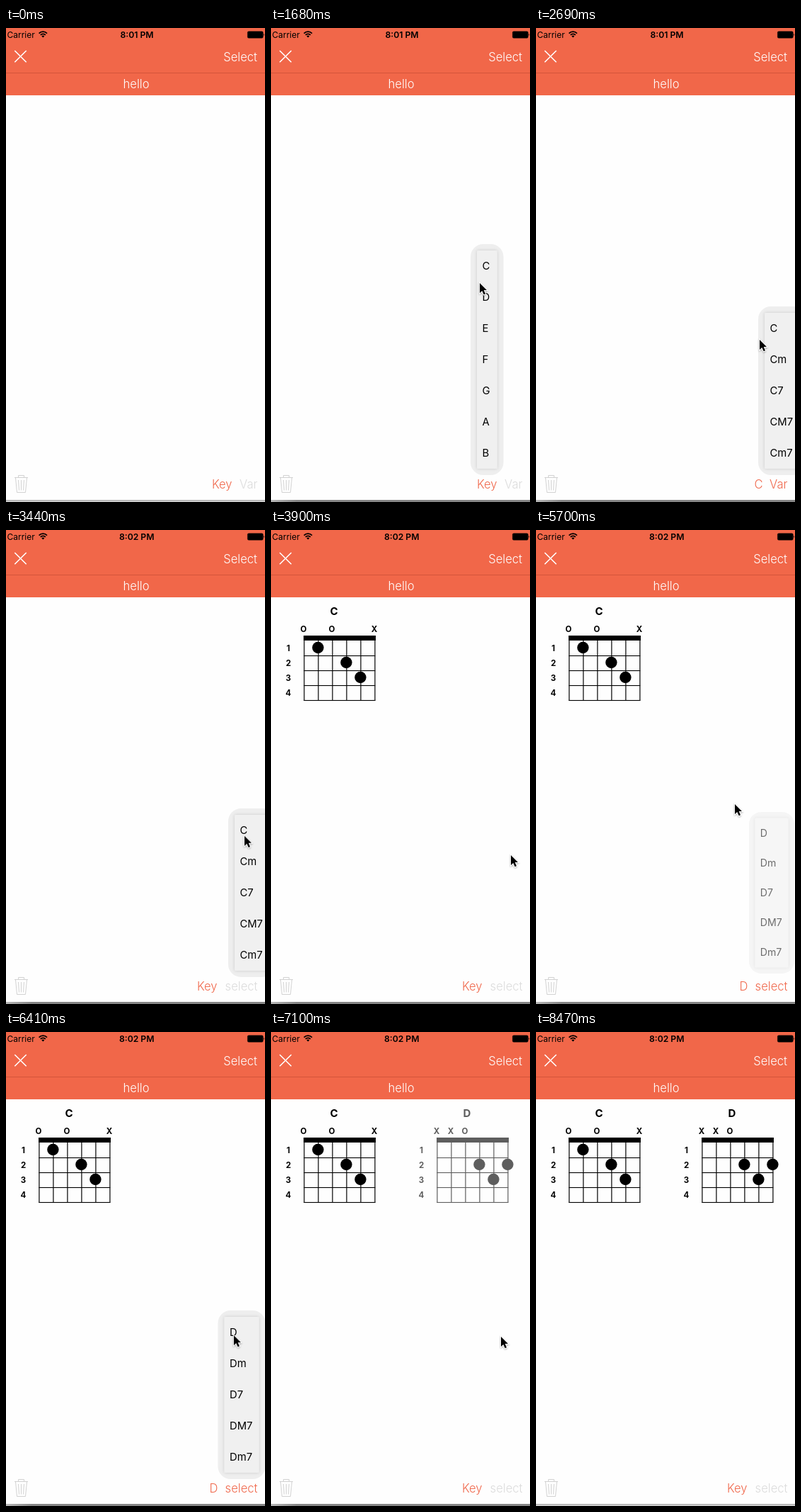
These frames come from a looping animation (366 px wide and 669 px high, 8.53 s). An HTML page:

```html
<!DOCTYPE html>
<html lang="en">
<head>
<meta charset="utf-8">
<title>Chord picker</title>
<style>
  html, body { margin: 0; width: 100%; height: 100%; overflow: hidden; background: #fefefe; }
  svg { display: block; width: 100%; height: 100%; }
  text { font-family: Inter, Roboto, sans-serif; }
  .bar { font-size: 16.6px; font-weight: 300; }
  .status { font-size: 12px; }
  .on { fill: #f0694d; }
  .off { fill: #dcdcdc; }
  .item { font-size: 14.8px; }
  .chord text { font-weight: 700; font-size: 11.5px; text-anchor: middle; }
  .chord .name { font-size: 15px; }
  .popover { transform-box: fill-box; transform-origin: center; }
</style>
</head>
<body>
<svg id="stage" viewBox="0 0 366 669" xmlns="http://www.w3.org/2000/svg">
  <defs>
    <filter id="soft" x="-50%" y="-10%" width="200%" height="120%">
      <feDropShadow dx="0" dy="0" stdDeviation="2" flood-color="#000" flood-opacity=".16"/>
    </filter>
    <filter id="drop" x="-50%" y="-50%" width="200%" height="200%">
      <feDropShadow dx="0" dy="1" stdDeviation=".8" flood-color="#000" flood-opacity=".35"/>
    </filter>
    <linearGradient id="edgeLight" x2="0" y2="1">
      <stop stop-color="#a8a8a8"/><stop offset="1" stop-color="#dadada"/>
    </linearGradient>
    <linearGradient id="edgeDark">
      <stop stop-color="#b8b8b8"/><stop offset=".1" stop-color="#858585"/><stop offset="1" stop-color="#858585"/>
    </linearGradient>
  </defs>

  <rect width="366" height="669" fill="#fefefe"/>
  <rect width="366" height="95" fill="#f16749"/>
  <rect y="63" width="366" height="1" fill="#d4553a"/>

  <text class="status" x="1.5" y="13.7">Carrier</text>
  <g fill="none" stroke="#000" stroke-width="1.7">
    <path d="M46.6 7.6a8 8 0 0 1 11.4 0M48.8 9.9a4.9 4.9 0 0 1 7 0"/>
    <path d="M52.3 13.6l-2-2.1a2.8 2.8 0 0 1 4 0z" fill="#000" stroke="none"/>
  </g>
  <g id="clock" font-weight="600" text-anchor="middle" font-size="12.2"></g>
  <rect x="341.3" y="4.8" width="22" height="9.4" rx="1.6" stroke="#000" stroke-opacity=".55" stroke-width=".7"/>
  <path d="M364.2 7.6q1.6 1.9 0 3.8z"/>

  <path d="M12.3 32l16.4 16.2M28.7 32l-16.4 16.2" stroke="#fff" stroke-width="1.6"/>
  <text class="bar" x="355" y="47" fill="#fff" text-anchor="end">Select</text>
  <text class="bar" x="184" y="85" fill="#fff" text-anchor="middle">hello</text>

  <path fill="none" stroke="#d2d2d2" d="M12 634.5h19M17.5 634v-2.5h8v2.5M13.5 635l2 20.5h12l2-20.5M17.5 638l1 14.500M21.500 638v14.500M25.500 638l-1 14.500"/>

  <g id="chords"></g>
  <g id="labels"></g>
  <rect y="666" width="366" height="3" fill="url(#edgeLight)"/>
  <g id="edge"><rect y="666" width="366" height="3" fill="url(#edgeDark)"/></g>
  <g id="popovers"></g>
  <g id="cursor">
    <path d="M0 0V14L3.300 11L5.700 16.300L8 15.300L5.700 10.100H10Z" stroke="#fff" stroke-width="1.800" paint-order="stroke" filter="url(#drop)"/>
  </g>
</svg>
<script>
const LOOP = 8530;
const byId = id => document.getElementById(id);

function add(parent, tag, attrs = {}, text = "") {
  const el = document.createElementNS("http://www.w3.org/2000/svg", tag);
  for (const key in attrs) el.setAttribute(key, attrs[key]);
  el.textContent = text;
  parent.appendChild(el);
  return el;
}

// steps: [time, style] pairs; the first and last styles hold to the loop's ends
function play(el, steps) {
  const all = [[0, steps[0][1]], ...steps, [LOOP, steps[steps.length - 1][1]]];
  const frames = all.map(([t, style]) => ({ offset: t / LOOP, ...style }));
  el.animate(frames, { duration: LOOP, iterations: Infinity }).startTime = 0;
}

const opacity = (...steps) => steps.map(([t, v]) => [t, { opacity: v }]);

function show(el, from, to) {
  const steps = [];
  if (from > 0) steps.push([from, 0]);
  steps.push([from, 1], [to, 1]);
  if (to < LOOP) steps.push([to, 0]);
  play(el, opacity(...steps));
}

function popover(x, y, width, items, opens, closes) {
  const height = items.length * 44;
  const g = add(byId("popovers"), "g", { class: "popover" });
  add(g, "rect", { x: x - 9, y: y - 9, width: width + 18, height: height + 18, rx: 18, fill: "#eeeeee" });
  add(g, "rect", { x, y, width, height, rx: 2, fill: "#f0f0f0", filter: "url(#soft)" });
  items.forEach((item, i) => add(g, "text", { class: "item", x: x + 7.5, y: y + 27.4 + i * 44 }, item));
  const shut = { opacity: 0, transform: "scale(.9)" };
  const open = { opacity: 1, transform: "scale(1)" };
  play(g, [[opens, shut], [opens + 150, open], [closes, open], [closes + 140, shut]]);
}

function chord(name, dx, marks, dots, appears) {
  const g = add(byId("chords"), "g", { class: "chord", transform: `translate(${dx})` });
  const label = (x, y, text, cls = "") => add(g, "text", { x, y, class: cls }, text);
  label(89, 120.3, name, "name");
  marks.forEach(([string, mark]) => label(46 + string * 20, 144.2, mark));
  add(g, "rect", { x: 46, y: 149, width: 102, height: 7 });
  for (let i = 0; i < 6; i++) add(g, "rect", { x: 46.3 + i * 20, y: 150, width: 1.2, height: 91 });
  for (let i = 1; i < 5; i++) {
    add(g, "rect", { x: 46.3, y: 156 + i * 21, width: 101, height: 1.1 });
    label(24.5, 150.2 + i * 21, i);
  }
  dots.forEach(([string, fret]) => add(g, "circle", { cx: 46.4 + string * 20, cy: 145 + fret * 21, r: 8.2 }));
  play(g, opacity([appears, 0], [appears + 200, 1]));
}

function labels(key, keyEnd, variant, active, from, to) {
  const g = add(byId("labels"), "g", { class: "bar", "text-anchor": "end" });
  add(g, "text", { x: keyEnd, y: 650, class: "on" }, key);
  add(g, "text", { x: 355.5, y: 650, class: active ? "on" : "off" }, variant);
  show(g, from, to);
}

const pickC = 2230, addC = 3440, pickD = 5465, addD = 6940;

show(add(byId("clock"), "text", { x: 185, y: 13.7 }, "8:01 PM"), 0, 3000);
show(add(byId("clock"), "text", { x: 184.7, y: 13.7 }, "8:02 PM"), 3000, LOOP);
show(byId("edge"), 540, 8470);

labels("Key", 319.5, "Var", false, 0, pickC);
labels("C", 320.5, "Var", true, pickC, addC);
labels("Key", 298.5, "select", false, addC, pickD);
labels("D", 299.5, "select", true, pickD, addD);
labels("Key", 298.5, "select", false, addD, LOOP);

const keys = [..."CDEFGAB"];
const variants = root => ["", "m", "7", "M7", "m7"].map(suffix => root + suffix);
popover(291, 314, 28.5, keys, 1110, pickC);
popover(323, 402, 48, variants("C"), 2360, addC);
popover(270, 314, 28.5, keys, 4430, pickD);
popover(308.5, 402, 49, variants("D"), 5615, addD);

chord("C", 0, [[0, "O"], [2, "O"], [5, "X"]], [[1, 1], [3, 2], [4, 3]], 3480);
chord("D", 188, [[0, "X"], [1, "X"], [2, "O"]], [[3, 2], [5, 2], [4, 3]], 6975);

const path = [
  [480, 368, 560], [960, 302, 641], [1300, 301, 641], [1680, 295, 360],
  [2000, 298, 338], [2230, 298, 338], [2510, 316, 440], [2690, 316, 440],
  [3100, 336, 425], [3500, 337, 432], [3900, 339, 459], [4360, 284, 649],
  [4620, 284, 649], [5200, 280, 386], [5700, 281, 387], [6110, 315, 424],
  [6600, 325, 430]
];
play(byId("cursor"), path.map(([t, x, y]) =>
  [t, { transform: `translate(${x}px, ${y}px)`, easing: "ease-in-out" }]));
play(byId("cursor").firstElementChild, opacity([480, 0], [480, 1], [7370, 1], [7460, 0]));
</script>
</body>
</html>
```
